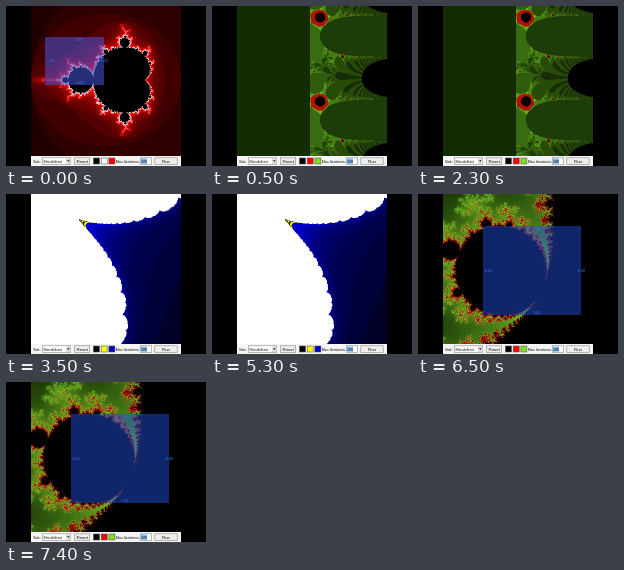
Animation of 200x160 px, one loop 8000 ms. Source, as an HTML page with a canvas:

```html
<!DOCTYPE html>
<html lang="en">
<head>
<meta charset="utf-8">
<title>Fractal explorer</title>
<style>
  html, body { margin: 0; width: 100%; height: 100%; overflow: hidden; background: #000; }
  #stage { position: fixed; inset: 0; overflow: hidden; }
  .view { position: absolute; inset: 0; overflow: hidden; animation: 8s step-end infinite; }
  .view canvas { position: absolute; left: 25px; top: 0; }
  .view svg { position: absolute; left: 0; top: 0; }
  .view:nth-child(2) { animation-name: second; }
  .view:nth-child(3) { animation-name: third; }
  .view:nth-child(4) { animation-name: fourth; }
  text { font: 4.4px "Liberation Sans", Arial, sans-serif; fill: #111; }
  .small { font-size: 3.7px; }
  .coord { font-size: 3.6px; fill: #3f7cf0; text-anchor: middle; }
  @keyframes second { 0% { visibility: hidden; } 6.25%, 100% { visibility: visible; } }
  @keyframes third { 0% { visibility: hidden; } 43.75%, 100% { visibility: visible; } }
  @keyframes fourth { 0% { visibility: hidden; } 81.25%, 100% { visibility: visible; } }
</style>
</head>
<body>
<div id="stage"></div>
<script>
const SIZE = 150, LEFT = 25;
const BLACK = [0, 0, 0], WHITE = [255, 255, 255], RED = [175, 20, 10];
const clamp = t => Math.min(1, Math.max(0, t));
const mix = (a, b, t) => a.map((v, i) => v + (b[i] - v) * clamp(t));

// Complex numbers as [re, im]
const polar = (r, a) => [r * Math.cos(a), r * Math.sin(a)];
const add = (a, b) => [a[0] + b[0], a[1] + b[1]];
const mul = (a, b) => [a[0] * b[0] - a[1] * b[1], a[0] * b[1] + a[1] * b[0]];
const power = (a, p) => polar(Math.hypot(...a) ** p, Math.atan2(a[1], a[0]) * p);
// Parameter whose fixed point has the given multiplier
const cardioid = m => add(mul(m, [0.5, 0]), mul(mul(m, m), [-0.25, 0]));

// Steps of z² + c until escape
function steps([x, y], [cx, cy], limit) {
  let n = 0;
  for (; n < limit; n++) {
    const xx = x * x, yy = y * y;
    if (xx + yy > 4) break;
    y = 2 * x * y + cy;
    x = xx - yy + cx;
  }
  return n;
}

function wholeSet(px, py) {
  const n = steps([0, 0], [(px - LEFT) / 50 - 2, (py - 74) / 50], 100);
  if (n === 100) return BLACK;
  if (n < 13) return [12 + n * 18, 0, 0];
  return mix([250, 10, 10], WHITE, (n - 13) / 18);
}

// Orbits of exp(z) + c: they drain to the left, overflow to the right or circle a fixed point
const HUB = [0.006, 1.72];
const EXP_C = add(HUB, mul(polar(Math.exp(HUB[0]), HUB[1]), [-1, 0]));
function expForest(px, py) {
  const unit = 84 / (2 * Math.PI);
  let x = (px - 108.5) / unit, y = (py - 72) / unit, n = 0;
  for (; n < 100 && x > -0.8; n++) {
    if (x > 22) return n < 2 ? BLACK : mix([45, 85, 12], BLACK, 1 / n);
    const r = Math.exp(x);
    x = r * Math.cos(y) + EXP_C[0];
    y = r * Math.sin(y) + EXP_C[1];
  }
  if (n === 100) return BLACK;
  return n > 15 ? RED : mix([20, 43, 3], [105, 190, 30], n / 9);
}

// A filled Julia set seen along the fjord that ends at its repelling fixed point
const MULT = [0.8, 0.03];
const JULIA_C = cardioid(MULT), TIP = [1 - MULT[0] / 2, -MULT[1] / 2];
function fjord(px, py) {
  const axis = 26 * Math.PI / 180;
  const v = mul([(px - 72) / 110, (py - 24) / 110], polar(1, -axis));
  const n = steps(add(TIP, mul(power(v, 1.5), [0.4, 0])), JULIA_C, 200);
  if (n > 32) return WHITE;
  if (n < 18) return [0, 0, Math.min(205, 10 + n * 15)];
  return n % 4 < 2 ? [12, 12, 0] : [238, 230, 25];
}

// The 3/7 bulb, with the plane bent so that the body wraps around it
const TURN = 6 * Math.PI / 7;
const PINCH = cardioid(polar(1, TURN)), OUTWARD = polar(0.000325, (3 * TURN - Math.PI) / 2);
function bulb(px, py) {
  const v = mul([px - 124, 96 - py], polar(1, -155 * Math.PI / 180));
  const bent = add(v, mul(mul(v, v), [1 / 220, 0]));
  const n = steps([0, 0], add(PINCH, mul(OUTWARD, bent)), 500);
  if (n === 500) return BLACK;
  return n > 120 ? RED : mix([14, 38, 3], [110, 185, 35], Math.log(n / 12) / 1.9);
}

// Each pixel averages four samples
function paint(canvas, shade) {
  canvas.width = canvas.height = SIZE;
  const ctx = canvas.getContext("2d"), img = ctx.createImageData(SIZE, SIZE);
  for (let y = 0, i = 0; y < SIZE; y++) for (let x = 0; x < SIZE; x++, i += 4) {
    for (let s = 0; s < 4; s++) {
      const c = shade(LEFT + x + 0.25 + (s & 1) / 2, y + 0.25 + (s >> 1) / 2);
      for (let k = 0; k < 3; k++) img.data[i + k] += c[k] / 4;
    }
    img.data[i + 3] = 255;
  }
  ctx.putImageData(img, 0, 0);
}

const rect = (x, y, w, h, fill, stroke = "none") =>
  `<rect x="${x}" y="${y}" width="${w}" height="${h}" fill="${fill}" stroke="${stroke}" stroke-width=".6"/>`;
const label = (x, y, s, cls = "") => `<text x="${x}" y="${y}" class="${cls}">${s}</text>`;
const box = (x, w, fill) => rect(x, 151.8, w, 6.7, fill, "#888");

const toolbar = colors =>
  rect(LEFT, 150, SIZE, 10, "#f4f4f4") +
  label(27, 157, "Set:") +
  box(36.3, 28.4, "#fff") + label(37.5, 156.9, "Mandelbrot", "small") +
  rect(60, 152.2, 4.4, 5.8, "#ddd") + '<path d="M61 154.2h2.6l-1.3 1.8z" fill="#222"/>' +
  box(68.3, 15.4, "#eee") + label(70.5, 157, "Reset") +
  colors.map((c, i) => rect(87.5 + i * 7.7, 152, 6, 6, c, "#555")).join("") +
  label(109.8, 157, "Max Iterations:", "small") +
  box(134.3, 11.4, "#fff") + rect(135, 152.5, 6, 5.2, "#82b8ee") + label(135, 156.8, "100", "small") +
  box(148.8, 22.4, "#eee") + label(156, 157, "Run");

function selection(x, y, w, h, fill, [left, right, top, bottom]) {
  const mx = x + w / 2 + 5, my = y + h / 2 + 1;
  return rect(x, y, w, h, fill) +
    label(x + 5, my, left, "coord") + label(x + w, my, right, "coord") +
    label(mx, y + 3.5, top, "coord") + label(mx, y + h - 1, bottom, "coord");
}

const greens = ["#000", "#f00", "#7de01e"];
const views = [
  [wholeSet, ["#000", "#fff", "#f00"],
    selection(39, 31, 59, 48, "rgba(72,88,232,.52)", ["-1.72", "-0.54", "0.87", "-0.09"])],
  [expForest, greens, ""],
  [fjord, ["#000", "#ff0", "#00c"], ""],
  [bulb, greens,
    selection(65, 32, 98, 89, "rgba(30,76,212,.5)", ["-0.61", "-0.60", "0.42", "0.41"])]
];

for (const [shade, colors, overlay] of views) {
  const view = document.createElement("div");
  view.className = "view";
  view.innerHTML = `<canvas></canvas><svg width="200" height="160" viewBox="0 0 200 160">${overlay}${toolbar(colors)}</svg>`;
  document.getElementById("stage").append(view);
  paint(view.firstChild, shade);
}
</script>
</body>
</html>
```
